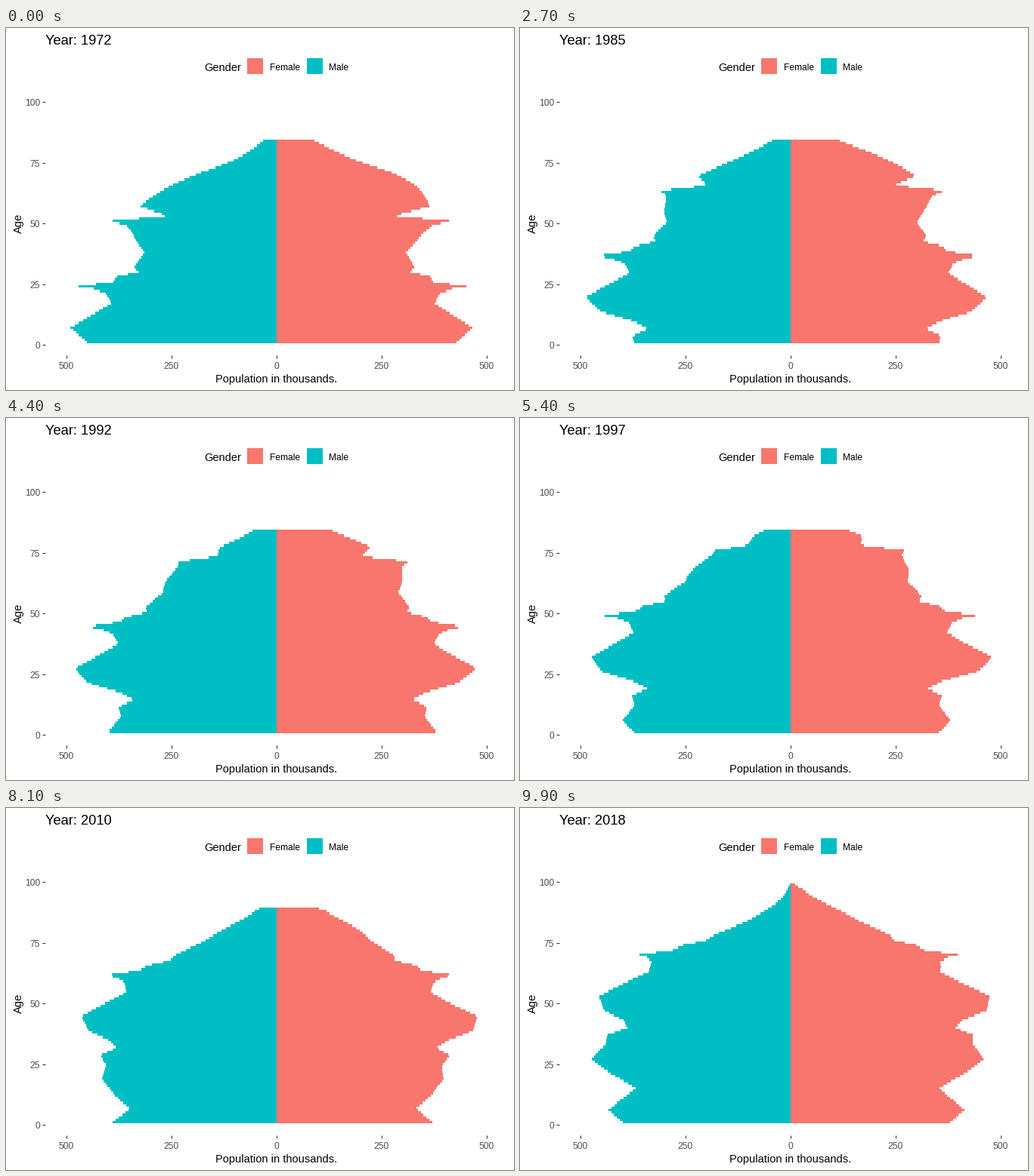
Write a matplotlib script that moves like this. It is 672x480 px and loops after 10000 ms.

```python
import matplotlib.pyplot as plt
import numpy as np
from matplotlib.animation import FuncAnimation
from matplotlib.patches import Rectangle

plt.rcParams["font.family"] = "Liberation Sans"

W, H, DPI = 672, 480, 96
FRAMES, INTERVAL = 100, 100
FIRST, LAST = 1972, 2018
MALE, FEMALE = "#00BFC4", "#F8766D"
MID, BASE = 358, 419.9            # position of zero on both axes
ROW, UNIT = 3.218, 0.556          # px per year of age, px per thousand
AGES = np.arange(1, 100)

# turning points of the birth curve: (year, boys as px of bar length)
BIRTHS = [(1887, 208), (1895, 218), (1900, 247), (1905, 251), (1914, 238),
          (1917, 188), (1918, 180), (1920, 255), (1922, 227), (1925, 211),
          (1933, 183), (1939, 193), (1941, 187), (1943, 215), (1945, 219),
          (1947, 265), (1948, 245), (1950, 228), (1954, 220), (1964, 273),
          (1970, 251), (1974, 206), (1977, 188), (1980, 209), (1984, 206),
          (1990, 222), (1996, 203), (2002, 186), (2011, 234), (2016, 221)]

# share of births, death rate at 70, its yearly growth, net migration by cohort
MEN = (1.0, 0.043, 0.070, [(1945, 0), (1953, -6), (1964, -9), (1970, 0),
                           (1977, 30), (1990, 52)])
WOMEN = (0.95, 0.024, 0.083, [(1958, 0), (1964, 8), (1970, 22),
                              (1977, 40), (1990, 56)])


def curve(x, points):
    return np.interp(x, *zip(*points))


def population(sex, year):
    """Bar length per age: births, less deaths, plus migration."""
    share, rate, growth, migration = sex
    born = year - 1 - AGES
    d = born - 1920.0
    health = np.exp(-0.022 * d - 0.0003 * d * d)
    deaths = rate / growth * health * np.exp(growth * (AGES - 70))
    peak = 27 - 0.3 * np.maximum(born - 1977, 0)
    adults = curve(born, migration) / (1 + np.exp((peak - AGES) / 3))
    children = np.clip((born - 1990) / 6, 0, 1) * np.minimum(AGES, 10)
    return share * curve(born, BIRTHS) * np.exp(-deaths) + adults + children


def shown(year):
    oldest = 84 if year < 2002 else 89 if year < 2014 else 99
    return (AGES <= oldest).astype(float)


fig = plt.figure(figsize=(W / DPI, H / DPI), dpi=DPI, facecolor="white")
ax = fig.add_axes([0, 0, 1, 1])
ax.set_xlim(0, W)
ax.set_ylim(H, 0)
ax.axis("off")


def label(x, y, text, px, color="black", va="baseline", **kw):
    return ax.text(x, y, text, fontsize=px * 72 / DPI, color=color, va=va, **kw)


def tick(xs, ys):
    ax.plot(xs, ys, color="#333333", lw=0.8, solid_capstyle="butt")


def make_bars(color):
    return [ax.add_patch(Rectangle((MID, BASE - (a + 0.5) * ROW), 0, ROW,
                                   fc=color, lw=0, antialiased=False))
            for a in AGES]


sides = [(MEN, -1, make_bars(MALE)), (WOMEN, 1, make_bars(FEMALE))]

for a in range(0, 101, 25):
    y = BASE - a * ROW + 0.4
    tick([48, 52], [y, y])
    label(45, y + 4.8, str(a), 12, "#4D4D4D", ha="right")
for v in range(-500, 501, 250):
    x = MID - 0.4 + v * UNIT
    tick([x, x], [434, 438])
    label(x, 452, str(abs(v)), 12, "#4D4D4D", ha="center")

label(MID - 0.4, 470, "Population in thousands.", 14.67, ha="center")
label(24, 259, "Age", 14.67, rotation=90, ha="right", va="center")
label(262, 57, "Gender", 14.67)
for x, name, color in [(319, "Female", FEMALE), (398, "Male", MALE)]:
    ax.add_patch(Rectangle((x, 40), 21, 21, fc=color, lw=0))
    label(x + 29.5, 56, name, 12)
title = label(52, 22, "", 18.2)


def update(i):
    now = FIRST + (LAST - FIRST) * i / (FRAMES - 1)
    year = min(int(now), LAST - 1)
    t = now - year

    def blend(f):
        return (1 - t) * f(year) + t * f(year + 1)

    alphas = blend(shown)
    for sex, side, bars in sides:
        sizes = blend(lambda y: population(sex, y))
        for bar, size, alpha in zip(bars, sizes, alphas):
            bar.set_width(side * size)
            bar.set_alpha(alpha)
            bar.set_visible(alpha > 0)
    title.set_text(f"Year: {round(now)}")
    return [title]


anim = FuncAnimation(fig, update, frames=FRAMES, interval=INTERVAL,
                     repeat=True, repeat_delay=0)
plt.show()
```
